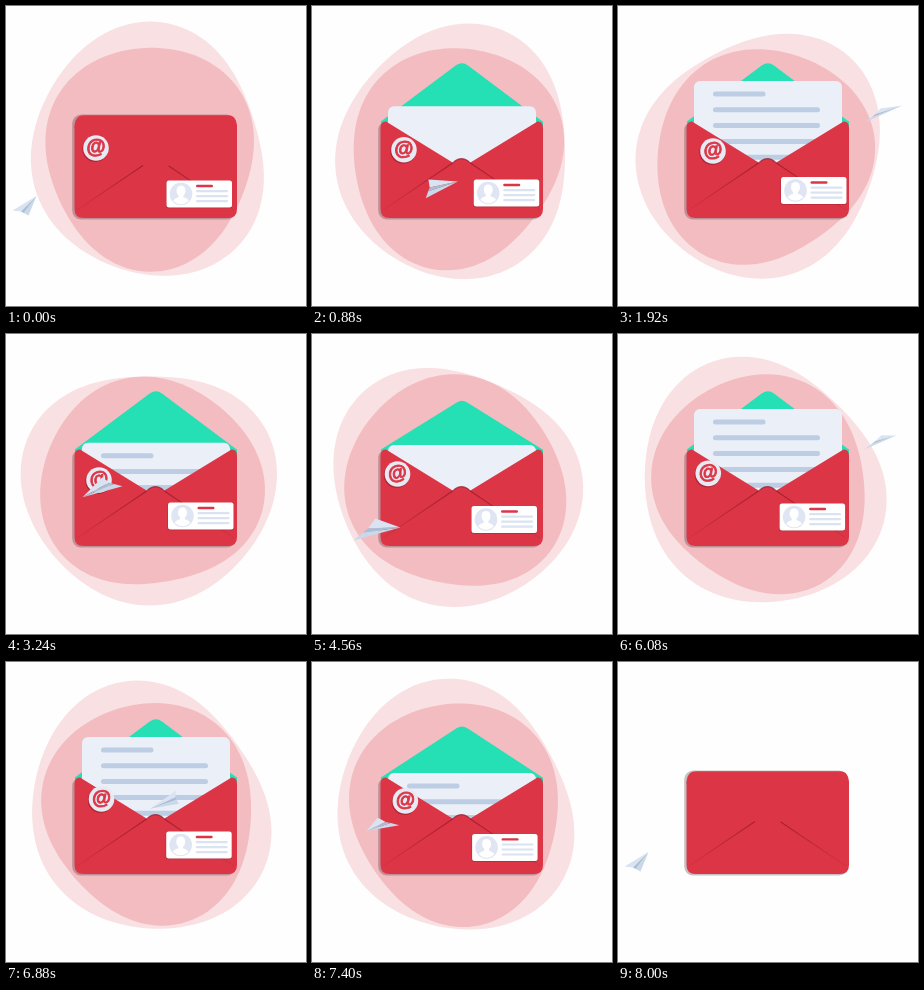
An HTML page with a canvas for the animation above (8040 ms loop, 300 by 300 pixels).

```html
<!DOCTYPE html>
<html lang="en">
<head>
<meta charset="utf-8">
<title>Envelope</title>
<style>
  html, body { margin: 0; width: 100%; height: 100%; overflow: hidden; background: #fefefe; }
  canvas { display: block; width: 300px; height: 300px; }
</style>
</head>
<body>
<canvas id="stage"></canvas>
<script>
const LOOP = 8040, CYCLE = 4000, STEP = 40, TURN = Math.PI * 2;
const RED = '#dc3646', TEAL = '#25dfb5', PAPER = '#ebeff8', INK = '#bdcde3';
const HINGE = 115.7;

const canvas = document.getElementById('stage');
const ratio = window.devicePixelRatio || 1;
canvas.width = canvas.height = 300 * ratio;
const c = canvas.getContext('2d');
c.scale(ratio, ratio);

// Keys as [share of the period, ...values]
// Floating: badge x, y and card offset x, y
const floatKeys = [
  [0, 90, 142, 0, 0],
  [0.24, 95, 145, 2.5, -3.5],
  [0.405, 93, 146, 1.5, -6],
  [0.57, 85.5, 140, -1, -2.5],
  [0.665, 84.5, 142, 2, -4],
  [0.86, 95.5, 137, -0.3, -5]
];
// Plane attitude: tail-to-nose vector and half wing span vector
const planeKeys = [
  [0, 16, -17, 8, 2.5],
  [0.14, 36, -2, -11, 11],
  [0.33, 20.5, -17.5, 13.5, 5.5],
  [0.48, 30, -10, -8, 7],
  [0.72, -27.5, 11.5, 1.5, 6.5],
  [0.81, -30, 15.5, 10, 4.5]
];

// Periodic cubic curve through the keys
function curve(keys, at) {
  const n = keys.length;
  const key = i => keys[(i + n) % n];
  const time = i => key(i)[0] + Math.floor(i / n);
  let i = n - 1;
  while (keys[i][0] > at) i--;
  const span = time(i + 1) - time(i), u = (at - time(i)) / span;
  return key(i).slice(1).map((a, j) => {
    const value = k => key(k)[j + 1];
    const b = value(i + 1);
    const slope = k => (value(k + 1) - value(k - 1)) / (time(k + 1) - time(k - 1)) * span;
    const m = slope(i), e = slope(i + 1);
    return a + u * (m + u * (3 * (b - a) - 2 * m - e + u * (2 * (a - b) + m + e)));
  });
}

const clamp = x => Math.min(1, Math.max(0, x));
const part = (t, from, to) => clamp((t - from) / (to - from));
const ease = (t, from, to) => { const p = part(t, from, to); return p * p * (3 - 2 * p); };
const rad = deg => deg * Math.PI / 180;

function fillPath(path, color) {
  c.fillStyle = color;
  c.fill(path);
}

function box(x, y, w, h, r, color) {
  const p = new Path2D();
  p.roundRect(x, y, w, h, r);
  fillPath(p, color);
}

function disc(x, y, r, color) {
  const p = new Path2D();
  p.arc(x, y, r, 0, TURN);
  fillPath(p, color);
}

// A circle with a two-fold and a three-fold wave travelling around it
function blob(x, y, r, two, three, color) {
  const p = new Path2D();
  for (let i = 0; i < 120; i++) {
    const a = i / 120 * TURN;
    const d = r + two.size * Math.cos(2 * a - two.phase) + three.size * Math.cos(3 * a - three.phase);
    p.lineTo(x + d * Math.cos(a), y + d * Math.sin(a));
  }
  p.closePath();
  fillPath(p, color);
}

function background(p) {
  const turn = p * TURN, swing = 1 - Math.cos(turn);
  const wave = (size, start, lead = 0) => ({ size, phase: rad(start + lead * swing) + turn });
  blob(143, 146.5 + 3 * swing, 121, wave(6.5, 151, 35), wave(5, 122), 'rgba(220,54,70,.15)');
  blob(144, 149.5, 107.7, wave(4.3, 181, 15), wave(4.3, 265), 'rgba(220,54,70,.21)');
}

const front = new Path2D('M68.5 122Q68.5 115 74 115.5L141 156.7Q149.5 148.7 158 156.7L225.5 115.5' +
  'Q231 115 231 122V203Q231 212 222 212H77.5Q68.5 212 68.5 203Z');
const folds = new Path2D('M71 204L141 156.7Q149.5 148.7 158 156.7L228 204');
const foldInk = c.createRadialGradient(150, 155, 5, 150, 155, 92);
foldInk.addColorStop(0, 'rgba(140,18,34,.7)');
foldInk.addColorStop(0.5, 'rgba(140,18,34,.4)');
foldInk.addColorStop(1, 'rgba(140,18,34,.1)');

// side: 1 closed, 0 edge-on, -1 open
function flap(side) {
  const p = new Path2D();
  const closed = Math.max(0, side);
  const tip = HINGE + side * (side > 0 ? 51 : 60.8);
  const top = HINGE - 6.5 * closed, low = HINGE + 6 * closed;
  p.moveTo(68.5, low);
  p.quadraticCurveTo(68.5, top, 78, top);
  p.lineTo(222, top);
  p.quadraticCurveTo(231, top, 231, low);
  p.arcTo(150, tip, 68.5, low, 10);
  p.closePath();
  fillPath(p, side > 0 ? RED : TEAL);
  if (side <= 0) box(69, HINGE - 0.5, 162, 7, 0, TEAL);
}

function letter(t) {
  const up = ease(t, 720, 1160) - ease(t, 2900, 3300);
  const y = 111 - 36 * up;
  box(76, y, 148, 205 - y, 6, PAPER);
  for (let i = 0; i < 5; i++) {
    const start = 900 + 120 * i;
    const w = (i ? 107 : 52.5) * part(t, start, start + 120);
    if (w > 0) box(95, y + 10.5 + 15.8 * i, w, 5, Math.min(2.5, w / 2), INK);
  }
}

function envelope(t) {
  const side = 1 - 2 * (ease(t, 30, 675) - ease(t, 3300, 3950));
  const shade = 115 - 6.5 * Math.max(0, side);
  box(66.2, shade, 163.5, 213.6 - shade, 9, 'rgba(50,35,40,.28)');
  if (side <= 0) flap(side);
  letter(t);
  fillPath(front, RED);
  c.strokeStyle = foldInk;
  c.lineWidth = 1.1;
  c.stroke(folds);
  if (side > 0) flap(side);
}

function badge(x, y, tilt) {
  c.save();
  c.translate(x, y);
  disc(-0.8, 1.2, 12.9, 'rgba(110,15,30,.4)');
  disc(0, 0, 12.8, '#e7e9f3');
  c.rotate(rad(tilt));
  c.font = 'bold 19.5px "Liberation Sans", Arial, sans-serif';
  c.fillStyle = c.strokeStyle = RED;
  c.lineWidth = 0.9;
  const m = c.measureText('@');
  const left = (m.actualBoundingBoxLeft - m.actualBoundingBoxRight) / 2;
  const base = (m.actualBoundingBoxAscent - m.actualBoundingBoxDescent) / 2;
  c.fillText('@', left, base);
  c.strokeText('@', left, base);
  c.restore();
}

function card(dx, dy) {
  c.save();
  c.translate(dx, dy);
  box(160, 175.3, 66, 27, 2.5, 'rgba(110,15,30,.35)');
  box(160.5, 174.5, 65.5, 27, 2.5, '#fff');
  box(190, 178.8, 17, 2.4, 1.2, RED);
  for (let i = 0; i < 3; i++) box(190, 184 + 5 * i, 32, 2.2, 1, '#d9e3f2');
  disc(175, 188, 11.3, '#dfe5f3');
  const clip = new Path2D();
  clip.arc(175, 188, 10.3, 0, TURN);
  c.clip(clip);
  const shoulders = new Path2D();
  shoulders.ellipse(175, 197, 8.5, 6, 0, 0, TURN);
  fillPath(shoulders, '#fff');
  box(172.6, 186, 4.8, 8, 2, '#fff');
  box(170.6, 179.5, 8.8, 10.5, 4.4, '#fff');
  c.restore();
}

function plane(q) {
  const a = q * TURN;
  const nose = [
    150.5 - 126 * Math.cos(a) + 25 * Math.sin(a) + 6 * Math.cos(2 * a),
    152 + 45 * Math.cos(a) + 6 * Math.sin(a) - 7 * Math.cos(2 * a) + 7 * Math.sin(2 * a)
  ];
  const [ax, ay, sx, sy] = curve(planeKeys, q);
  const corner = (back, side) => [nose[0] - ax * back + sx * side, nose[1] - ay * back + sy * side];
  const face = (from, to, color) => {
    const p = new Path2D();
    [nose, from, to].forEach(pt => p.lineTo(...pt));
    p.closePath();
    fillPath(p, color);
  };
  const fold = corner(0.92, -0.1), keel = corner(0.95, 0.3);
  face(corner(1, -1), fold, '#d9e3f1');
  face(keel, corner(1, 1), '#cbd8ea');
  face(fold, keel, '#aabfd3');
}

function draw(now) {
  const t = Math.floor(now % LOOP / STEP) * STEP;
  const phase = t % CYCLE;
  const p = t / CYCLE / 2 % 1;
  const dressed = t < 2 * CYCLE;   // the last step shows only envelope and plane
  const [bx, by, dx, dy] = curve(floatKeys, p);
  c.fillStyle = '#fefefe';
  c.fillRect(0, 0, 300, 300);
  if (dressed) background(p);
  envelope(phase);
  if (dressed) {
    badge(bx, by, -5 * (1 - Math.cos(p * TURN)));
    card(dx, dy);
  }
  plane(phase / CYCLE);
}

const begin = performance.now();
function tick() {
  draw(performance.now() - begin);
  requestAnimationFrame(tick);
}
tick();
</script>
</body>
</html>
```
